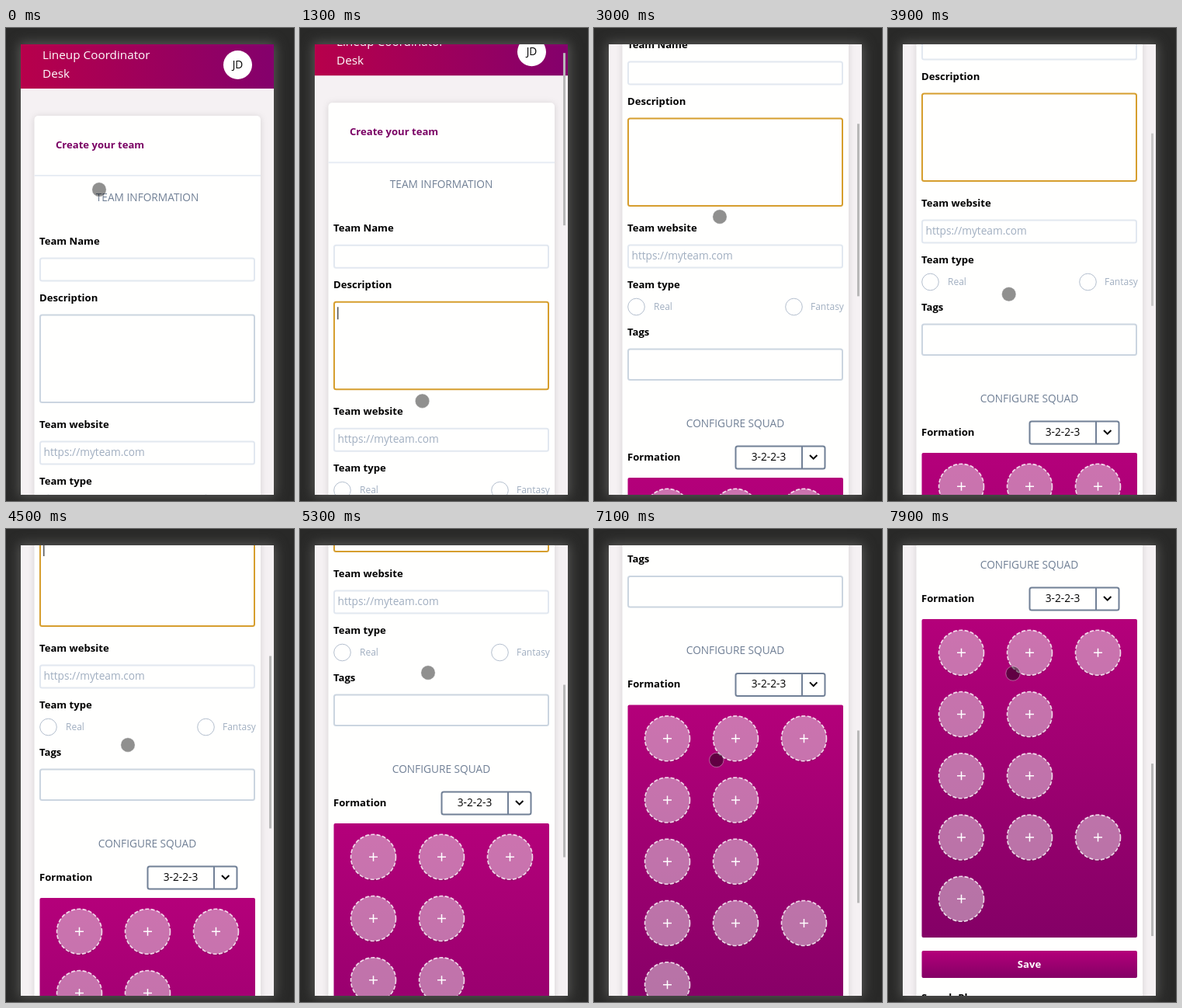
Animation of 371x609 px, one loop 8000 ms. Source, as an HTML page:

```html
<!DOCTYPE html>
<html lang="en">
<head>
<meta charset="utf-8">
<title>Team form</title>
<style>
  html, body { margin: 0; width: 100%; height: 100%; overflow: hidden; background: #292928; }
  #screen { position: absolute; left: 19px; top: 21px; width: 326px; height: 580px; overflow: hidden;
    background: #f5f1f3; box-shadow: 0 0 14px 2px #5a5a58; }
  svg { position: absolute; left: -19px; top: -21px; }
  text { font: 13.7px "Open Sans", "Noto Sans", sans-serif; }
  .bold { font-weight: 700; font-size: 13.1px; }
  .mid { text-anchor: middle; }
  .section { fill: #718096; }
  .hint { fill: #a0aec0; }
  .small { font-size: 12px; }
  .title { font-size: 15.3px; fill: #fff; }
  .card { fill: #fffffe; filter: drop-shadow(0 1px 4px #0002); }
  .slot { fill: #ffffff73; stroke: #ffffffd0; stroke-width: 1.6; stroke-dasharray: 5 2.4; }
  .plus { stroke: #fff; stroke-width: 1.5; }
</style>
</head>
<body>
<div id="screen">
  <svg width="371" height="609">
    <defs>
      <linearGradient id="head"><stop stop-color="#b7004b"/><stop offset="1" stop-color="#84006c"/></linearGradient>
      <linearGradient id="pitch" x2="0" y2="1"><stop stop-color="#b4007a"/><stop offset="1" stop-color="#840066"/></linearGradient>
    </defs>
    <g id="page"></g>
    <rect id="bar" x="339" width="3" height="222" fill="#b8b8b8"/>
    <circle id="finger" r="9.2" fill="#0000006f" stroke="#ffffff60"/>
  </svg>
</div>
<script>
const $ = id => document.getElementById(id);
const label = (x, y, s, cls = "") => `<text x="${x}" y="${y}" class="${cls}">${s}</text>`;
const rect = (x, y, w, h, attrs) => `<rect x="${x}" y="${y}" width="${w}" height="${h}" ${attrs}/>`;
const box = (y, h, color, id = "") =>
  rect(44, y + 1, 276, h - 2, `rx="2.5" fill="none" stroke="${color}" stroke-width="2" id="${id}"`);
const radio = (x, s, tx) =>
  `<circle cx="${x}" cy="612" r="10.8" fill="none" stroke="#b4bfce"/>` + label(tx, 616, s, "hint small");

function slot(x, y) {
  return `<circle cx="${x}" cy="${y + 1.5}" r="29.5" fill="#0000001a"/>
    <circle cx="${x}" cy="${y}" r="29" class="slot"/>
    <path d="M${x - 5.5} ${y}h11m-5.5-5.5v11" class="plus"/>`;
}

const slots = [3, 2, 2, 3, 1].map((n, row) =>
  [94.5, 182.5, 270.5].slice(0, n).map(x => slot(x, 875.3 + row * 79.25)).join("")).join("");

$("page").innerHTML =
  rect(19, 20, 326, 58, 'fill="url(#head)"') +
  label(47, 40, "Lineup Coordinator", "title") + label(47, 64, "Desk", "title") +
  '<circle cx="298.5" cy="47.5" r="18.5" fill="#fff"/>' + label(298.5, 52, "JD", "mid") +
  rect(36.5, 113, 291.5, 1400, 'rx="5" class="card"') +
  `<g fill="#7a0064">${label(64, 155, "Create your team", "bold")}</g>` +
  rect(36.5, 189, 291.5, 2, 'fill="#e8edf4"') +
  label(182, 223, "TEAM INFORMATION", "section mid") +
  label(43, 279, "Team Name", "bold") + box(295.5, 31, "#e2e8f0") +
  label(43, 352, "Description", "bold") + box(368.5, 114.5, "#cbd5e0", "area") +
  rect(48, 376, 1.5, 16, 'fill="#555" id="caret"') +
  label(43, 515, "Team website", "bold") + box(531.5, 31, "#e2e8f0") +
  label(48.5, 551, "https://myteam.com", "hint") +
  label(43, 588, "Team type", "bold") + radio(54.5, "Real", 77) + radio(257.5, "Fantasy", 279) +
  label(43, 649, "Tags", "bold") + box(665.5, 41.5, "#cbd5e0") +
  label(182, 767, "CONFIGURE SQUAD", "section mid") +
  label(43, 810, "Formation", "bold") +
  rect(182.5, 791.5, 115, 29, 'rx="2.5" fill="none" stroke="#718096" stroke-width="2"') +
  '<path d="M268 791v30" stroke="#718096" stroke-width="2"/>' +
  '<path d="M278 803l4.7 4.7 4.7-4.7" fill="none" stroke="#000" stroke-width="2"/>' +
  label(225, 810, "3-2-2-3", "mid") +
  rect(43.5, 832, 277.5, 410, 'rx="2" fill="url(#pitch)"') + slots +
  rect(43.5, 1259, 277.5, 35, 'rx="2" fill="url(#pitch)"') +
  `<g fill="#fff">${label(182, 1281, "Save", "bold mid")}</g>` +
  label(43, 1324, "Search Players", "bold");

// time, finger x, finger y, scroll
const keys = [
  [0, 120, 208, 0], [900, 157, 505, 0], [1100, 157, 505, 0], [1200, 157, 497, 0],
  [2100, 162, 346, 151], [3000, 162, 243, 253], [3400, 162, 211, 285], [3500, 162, 211, 285],
  [4000, 155, 358, 285], [4500, 157, 278, 357], [5300, 165, 185, 453], [5700, 166, 129, 509],
  [6300, 155, 400, 509], [6400, 155, 395, 509], [7900, 161, 186, 716], [8000, 161, 186, 716]
];

function pose(t) {
  const i = keys.findIndex(k => k[0] > t), a = keys[i - 1], b = keys[i];
  let u = (t - a[0]) / (b[0] - a[0]);
  if (a[3] === b[3]) u *= u * (3 - 2 * u); // free moves ease, drags stay linear
  return a.map((v, j) => v + (b[j] - v) * u);
}

// The bar lingers after each drag, then fades
function barOpacity(t) {
  if (t < 1200) return 0;
  const rest = t >= 5700 && t < 6500 ? t - 5700 : t >= 3400 && t < 4100 ? t - 3400 : 0;
  return Math.max(0, Math.min(1, 1 - (rest - 400) / 350));
}

function draw(now) {
  const t = Math.floor(now % 8000 / 100) * 100;
  const [, x, y, scroll] = pose(t);
  const focused = t >= 1200;
  $("page").setAttribute("transform", `translate(0 ${-scroll})`);
  $("finger").setAttribute("transform", `translate(${x} ${y})`);
  $("bar").setAttribute("y", 25.7 + scroll * .386);
  $("bar").setAttribute("opacity", barOpacity(t));
  $("area").setAttribute("stroke", focused ? "#d69e2e" : "#cbd5e0");
  $("caret").setAttribute("opacity", focused && (t - 1080) % 1000 < 500 ? 1 : 0);
  requestAnimationFrame(draw);
}
requestAnimationFrame(draw);
</script>
</body>
</html>
```
